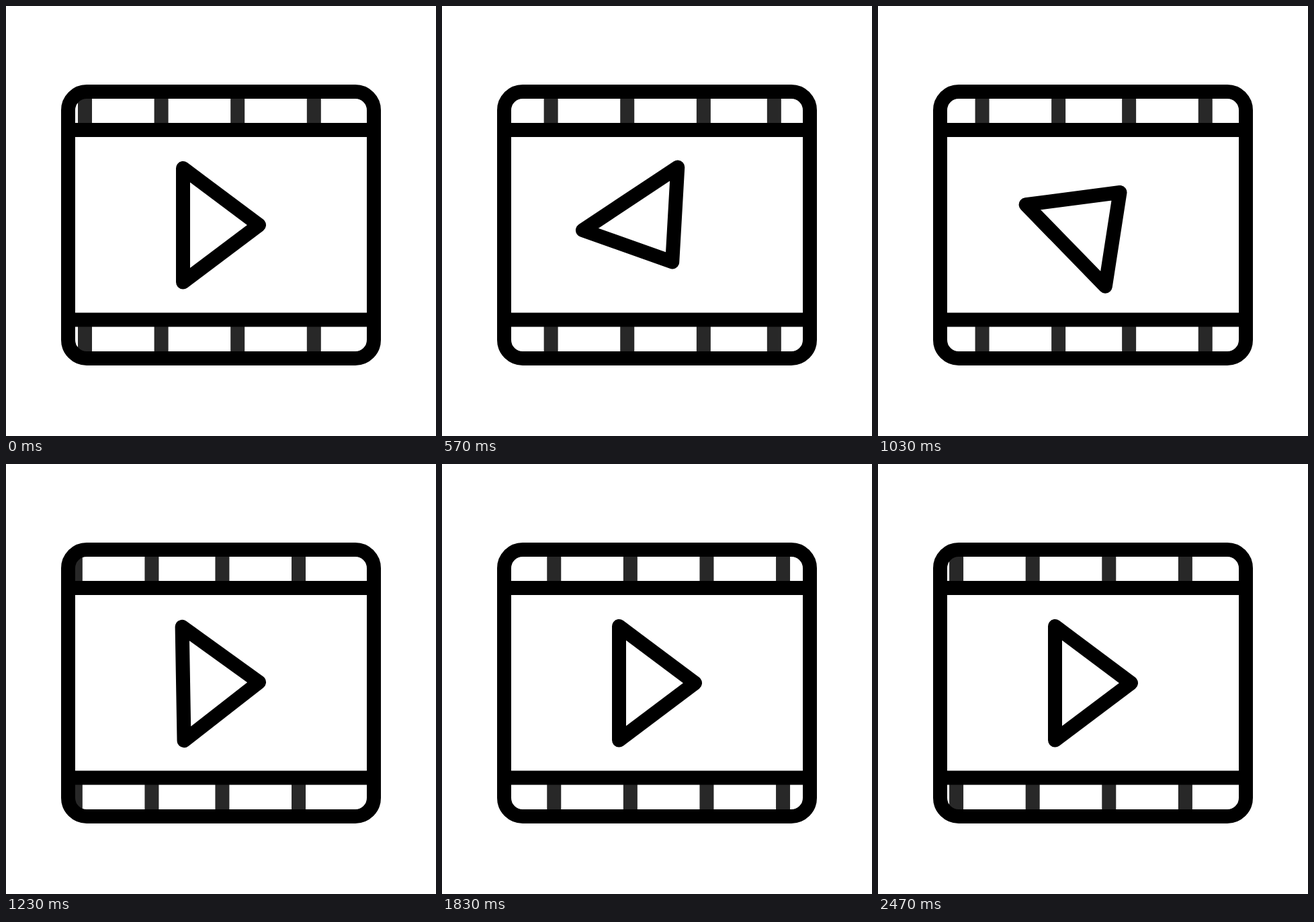
Recreate the animation shown at these times as an HTML page. Size 640 by 640 pixels, loop 2.5 s.

```html
<!DOCTYPE html>
<html lang="en">
<head>
<meta charset="utf-8">
<title>Film player icon</title>
<style>
  html, body { margin: 0; width: 100%; height: 100%; overflow: hidden; background: #fff; }
  svg { display: block; width: 100%; height: 100%; }
</style>
</head>
<body>
<svg viewBox="0 0 640 640">
  <clipPath id="film"><rect x="92.5" y="127.5" width="455" height="397" rx="27.5"/></clipPath>
  <g clip-path="url(#film)"><g id="bars" fill="none" stroke="#282828" stroke-width="21"></g></g>
  <g fill="none" stroke="#000" stroke-width="21" stroke-linecap="round" stroke-linejoin="round">
    <rect x="92.5" y="127.5" width="455" height="397" rx="27.5"/>
    <path d="M92.5 184.5H547.5M92.5 467H547.5"/>
    <path id="play" d="M263.5 241.5V411L376.5 326Z"/>
  </g>
</svg>
<script>
const LOOP = 2500, FPS = 30;
const START = 9;          // frame on which everything begins to move
const SPIN = 29.1;        // frames for one full turn
const SPEED = 8.62;       // strip travel per frame
const GAP = 113.6;

const bars = document.getElementById('bars');
const play = document.getElementById('play');

// The strip is joined after the fourth bar, where one gap is a step shorter.
const barX = k => 117.5 + k * GAP - (k > 3 ? SPEED : 0);
let d = '';
for (let k = 0; k < 10; k++) d += `M${barX(k)} 130V184M${barX(k)} 467V522`;
bars.innerHTML = `<path d="${d}"/>`;

// cubic-bezier(.42, 0, .58, 1)
function easeInOut(u) {
  if (u <= 0) return 0;
  if (u >= 1) return 1;
  let lo = 0, hi = 1, s = u;
  for (let i = 0; i < 24; i++) {
    s = (lo + hi) / 2;
    const r = 1 - s;
    const x = 1.26 * s * r * r + 1.74 * s * s * r + s * s * s;
    if (x < u) lo = s; else hi = s;
  }
  return s * s * (3 - 2 * s);
}

function draw(ms) {
  // Steps of 1/30 s, with starts rounded to 10 ms
  const frame = Math.floor((ms % LOOP) * FPS / 1000 + 0.11);
  const n = Math.max(0, frame - START);
  bars.setAttribute('transform', `translate(${-n * SPEED} 0)`);
  play.setAttribute('transform', `rotate(${360 * easeInOut(n / SPIN)} 308.5 322)`);
}

function tick() {
  draw(performance.now());
  requestAnimationFrame(tick);
}
tick();
</script>
</body>
</html>
```
